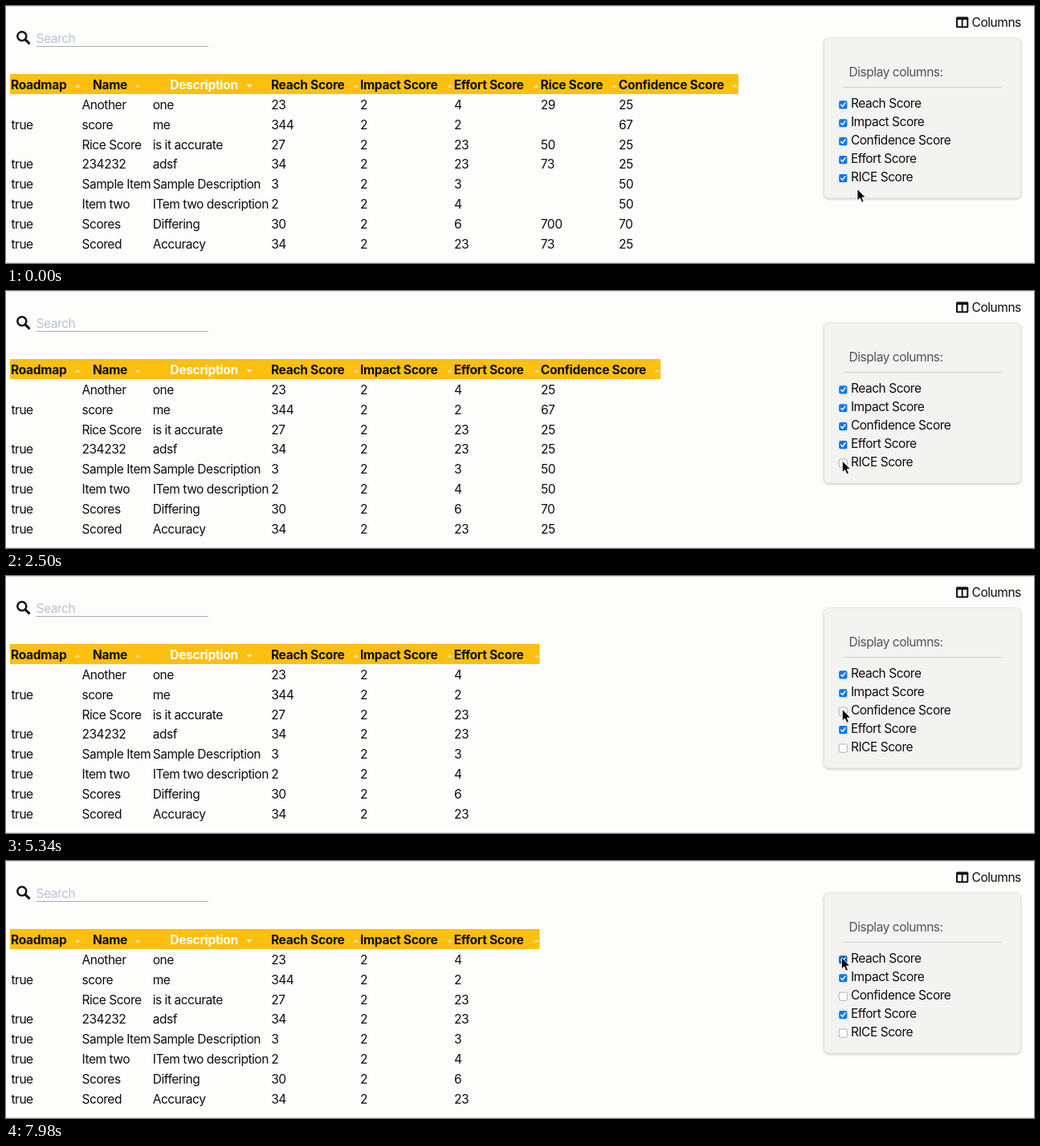
An HTML page that plays this animation: 1280x321 px, repeating every 8000 ms.

```html
<!DOCTYPE html>
<html lang="en">
<head>
<meta charset="utf-8">
<title>Column picker</title>
<style>
  html, body { margin: 0; width: 100%; height: 100%; overflow: hidden; background: #fdfdfc; }
  svg { display: block; }
  text { font: 15.5px Inter, Roboto, sans-serif; letter-spacing: -.46px; fill: #0c0d0f; white-space: pre; }
  .head { font-weight: 700; letter-spacing: -.28px; }
  .panel { filter: drop-shadow(0 1px 1.5px rgba(0, 0, 0, .22)); }
</style>
</head>
<body>
<svg id="stage" width="1280" height="321" viewBox="0 0 1280 321">
  <path d="M0 .5H1280" stroke="#d9d9db"/>
  <path d="M0 320.5H1280" stroke="#dfddd0"/>

  <g fill="none" stroke="#111214" stroke-linecap="round">
    <circle cx="19.8" cy="37.8" r="5.5" stroke-width="2.5"/>
    <path d="M24.4 42.4L28.6 46.4" stroke-width="3"/>
  </g>
  <text x="37.6" y="45.6" style="fill:#b8c4d6">Search</text>
  <path d="M38 50.5H252" stroke="#a9acb0"/>

  <path fill="#111214" fill-rule="evenodd" d="M1184.5 13.5h12.3q1.5 0 1.5 1.5v10.7q0 1.5-1.5 1.5h-12.3q-1.5 0-1.5-1.5V15q0-1.5 1.5-1.5zM1185 17.3v7.9h4.7v-7.9zM1191.6 17.3v7.9h4.7v-7.9z"/>
  <text x="1202.6" y="26.4">Columns</text>

  <rect class="panel" x="1018.5" y="40" width="245" height="200" rx="6" fill="#f3f3f2" stroke="#e4e4e3" stroke-width=".8"/>
  <text x="1049.6" y="88.3" style="fill:#505357">Display columns:</text>
  <path d="M1042 101.5H1240" stroke="#cfcfcf"/>

  <rect id="bar" x="5" y="85" height="25" fill="#fdbf10"/>
  <g id="table"></g>
  <g id="options"></g>
  <path id="cursor" d="M0 0V14.5L3.3 11.5L5.6 16.8L8.1 15.7L5.9 10.6H10.3Z" fill="#000" stroke="#fff" stroke-width=".9" stroke-linejoin="round"/>
</svg>
<script>
const LOOP = 8000, PRESS = 120;
const RICE_OFF = 2030, CONFIDENCE_OFF = 4700, REACH_OFF = LOOP;
const $ = id => document.getElementById(id);

function add(parent, tag, attrs, content = '') {
  const el = document.createElementNS('http://www.w3.org/2000/svg', tag);
  for (const key in attrs) el.setAttribute(key, attrs[key]);
  el.textContent = content;
  parent.append(el);
  return el;
}

// title, title x, cell x, sort arrow x, cells
const columns = [
  ['Roadmap', 6, 6.4, 89, ',true,,true,true,true,true,true'],
  ['Name', 108, 94.5, 164, 'Another,score,Rice Score,234232,Sample Item,Item two,Scores,Scored'],
  ['Description', 204.3, 182.7, 303, 'one,me,is it accurate,adsf,Sample Description,ITem two description,Differing,Accuracy'],
  ['Reach Score', 329.9, 330.2, 435.5, '23,344,27,34,3,2,30,34'],
  ['Impact Score', 440.9, 441, 552.5, '2,2,2,2,2,2,2,2'],
  ['Effort Score', 557.7, 558, 660.5, '4,2,23,23,3,4,6,23'],
  ['Rice Score', 665.6, 665.8, 757.5, '29,,50,73,,,700,73'],
  ['Confidence Score', 762.8, 762.9, 907.5, '25,67,25,25,50,50,70,25']
].map(([title, titleX, cellX, arrowX, cells]) => {
  const group = add($('table'), 'g', {});
  const sorted = title === 'Description';
  add(group, 'path', {
    d: `M${arrowX - 3.5} ${sorted ? 98 : 101.5}h7l-3.5 ${sorted ? 3.7 : -3.7}z`,
    fill: sorted ? '#fff' : '#fbe2a0'
  });
  add(group, 'text', { class: 'head', x: titleX, y: 104, style: sorted ? 'fill:#fff' : '' }, title);
  cells.split(',').forEach((cell, i) =>
    add(group, 'text', { x: cellX, y: 128.8 + 24.86 * i }, cell));
  return group;
});
const rice = columns[6], confidence = columns[7];

// each option is unticked at its own time, just after being pressed
const boxes = [
  ['Reach', REACH_OFF], ['Impact', Infinity], ['Confidence', CONFIDENCE_OFF],
  ['Effort', Infinity], ['RICE', RICE_OFF]
].map(([name, off], i) => {
  const group = add($('options'), 'g', { transform: `translate(1037 ${118 + 22.95 * i})` });
  const box = add(group, 'rect', { x: .2, y: .2, width: 10.2, height: 10.2, rx: 2, 'stroke-width': .9 });
  const tick = add(group, 'path', {
    d: 'M2.7 5.5L4.6 7.6L7.9 2.9', fill: 'none', stroke: '#fff',
    'stroke-width': 1.5, 'stroke-linecap': 'round', 'stroke-linejoin': 'round'
  });
  add(group, 'text', { x: 14.9, y: 9 }, name + ' Score');
  return { box, tick, off };
});

function drawBox({ box, tick, off }, t) {
  const on = t < off, pressed = on && t >= off - PRESS;
  box.setAttribute('fill', pressed ? '#0a58c8' : on ? '#0b76f0' : '#fff');
  box.setAttribute('stroke', on ? 'none' : '#a8a8a8');
  show(tick, on);
}

function show(el, on) {
  el.style.display = on ? '' : 'none';
}

// time, x, y of the pointer tip
const path = [
  [0, 1060, 228.5], [900, 1041.3, 210], [1500, 1041.3, 210],
  [1900, 1041.3, 212], [2500, 1041.3, 212], [3450, 1040.8, 169], [3700, 1040.8, 169],
  [4400, 1041.3, 166.5], [5400, 1041.3, 166.5], [6700, 1040.5, 128.5],
  [6900, 1040.5, 128.5], [7600, 1040.4, 120.5], [LOOP, 1040.4, 120.5]
];

function pointer(t) {
  const i = path.findIndex(p => p[0] > t);
  const [t0, x0, y0] = path[i - 1], [t1, x1, y1] = path[i];
  const u = (t - t0) / (t1 - t0), k = u * u * (3 - 2 * u);
  return `translate(${x0 + (x1 - x0) * k} ${y0 + (y1 - y0) * k})`;
}

function draw(t) {
  const riceOn = t < RICE_OFF, confidenceOn = t < CONFIDENCE_OFF;
  show(rice, riceOn);
  show(confidence, confidenceOn);
  confidence.setAttribute('transform', `translate(${riceOn ? 0 : -97} 0)`);
  $('bar').setAttribute('width', riceOn ? 907 : confidenceOn ? 810 : 659.5);
  boxes.forEach(box => drawBox(box, t));
  $('cursor').setAttribute('transform', pointer(t));
}

const start = performance.now();
function tick() {
  draw((performance.now() - start) % LOOP);
  requestAnimationFrame(tick);
}
tick();
</script>
</body>
</html>
```
